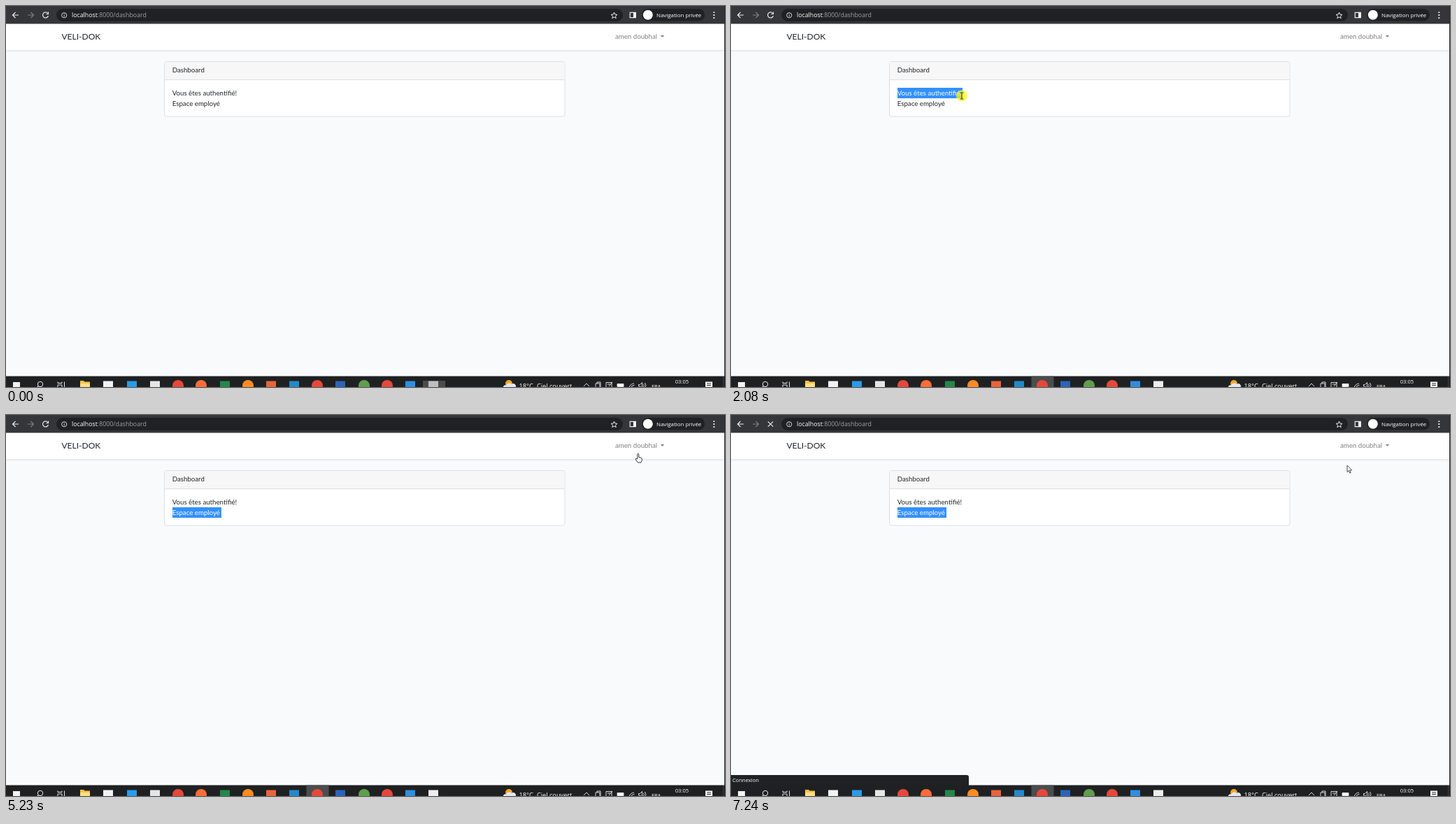
An HTML page for the animation above (8 s loop, 1028 px wide and 545 px high).

```html
<!DOCTYPE html>
<html lang="fr">
<head>
<meta charset="utf-8">
<title>Dashboard</title>
<style>
html, body { margin: 0; width: 100%; height: 100%; overflow: hidden; background: #f8fafc; }
svg { display: block; }
text { font: 9.7px Lato, sans-serif; fill: #212529; white-space: pre; }
.ui text, text.ui { font-family: "Open Sans", "Noto Sans", sans-serif; fill: #fff; }
.line { fill: none; stroke: #e8eaed; stroke-width: 1.2; }
</style>
</head>
<body>
<svg id="stage" width="1028" height="545" viewBox="0 0 1028 545">
  <defs>
    <filter id="soft" x="-5%" y="-50%" width="110%" height="200%"><feGaussianBlur stdDeviation="1.3"/></filter>
  </defs>
  <rect width="1028" height="545" fill="#f8fafc"/>

  <!-- page -->
  <rect y="28" width="1028" height="36.5" opacity=".09" filter="url(#soft)"/>
  <rect y="25" width="1028" height="38" fill="#fff"/>
  <text x="79.5" y="47.5" style="font-size:12px">VELI-DOK</text>
  <g id="user" opacity=".5">
    <text x="931" y="47" text-anchor="end" style="fill:#000">amen doubhal</text>
    <path d="M935.8 42h5.4l-2.7 2.8z"/>
  </g>
  <rect x="226.5" y="79.5" width="572.5" height="78.5" rx="3" fill="#fff" stroke="#dedfe0"/>
  <path d="M227 105.5V82.5q0-2.5 2.5-2.5H796q2.5 0 2.5 2.5v23z" fill="#f7f7f7"/>
  <path d="M227 105.5H798.5" stroke="#dedfe0"/>
  <text x="237.7" y="95.3">Dashboard</text>
  <text x="237.7" y="127.5">Vous êtes authentifié!</text>
  <text x="237.7" y="142.5">Espace employé</text>
  <svg id="pick1" x="238" y="117" width="0" height="15">
    <rect width="100" height="15" fill="#3390ff"/><text x="-.3" y="10.5" style="fill:#fff">Vous êtes authentifié!</text>
  </svg>
  <svg id="pick2" x="238" y="132" width="0" height="15">
    <rect width="100" height="15" fill="#3390ff"/><text x="-.3" y="10.5" style="fill:#fff">Espace employé</text>
  </svg>
  <g id="menu">
    <rect x="839.5" y="58.5" width="106.5" height="53" rx="3" fill="#fff" stroke="#d5d7d9"/>
    <rect id="hover" x="840" y="64" width="105.5" height="21" fill="#e9ecef"/>
    <text x="850.7" y="77.7">Profil</text>
    <text x="850.7" y="98.8">Logout</text>
  </g>

  <!-- browser bar -->
  <g class="ui">
    <rect width="1028" height="25.5" fill="#35363a"/>
    <rect x="72" y="4" width="810" height="18" rx="9" fill="#202124"/>
    <rect x="909" y="4" width="90" height="17.5" rx="8.7" fill="#202124"/>
    <path class="line" d="M18 13H10M13.5 9l-4 4 4 4"/>
    <path class="line" d="M31 13h8M35.5 9l4 4-4 4" opacity=".4"/>
    <path class="line" id="reload" d="M59.7 10.5A4 4 0 1 0 60.4 14M60.5 8.5v3h-3"/>
    <path class="line" id="stop" d="M52.8 9.3l7.4 7.4M60.2 9.3l-7.4 7.4"/>
    <circle class="line" cx="83.2" cy="13.2" r="3.6" style="stroke-width:.9"/>
    <path class="line" d="M83.2 11v1M83.2 12.8v2.5" style="stroke-width:.9"/>
    <text x="94" y="16.3" style="font-size:8.8px">localhost<tspan fill="#9aa0a6">:8000/dashboard</tspan></text>
    <path class="line" style="stroke-width:1" d="M869.5 9l1.2 3 3.2.3-2.4 2.1.7 3.2-2.7-1.7-2.7 1.7.7-3.2-2.4-2.1 3.2-.3z"/>
    <path class="line" d="M892.2 9.3h8v7.4h-8z"/><path d="M897 9h3.5v8H897z" fill="#fff"/>
    <circle cx="917.8" cy="12.8" r="7" fill="#fff"/>
    <text x="930" y="15.7" style="font-size:7.9px">Navigation privée</text>
    <path d="M1012.3 8.2v9.8" stroke="#e8eaed" stroke-width="1.9" stroke-dasharray="1.9 2"/>
  </g>

  <!-- link preview -->
  <g id="status" class="ui">
    <path id="statusBox" fill="#202124"/>
    <text id="statusText" x="2" y="525" style="font-size:7.6px"></text>
  </g>

  <!-- taskbar -->
  <rect y="529.5" width="1028" height="16" fill="#1f2022"/>
  <rect id="active" y="529.5" width="32" height="16" fill="#4b4c4e"/>
  <g id="apps"></g>
  <g class="ui">
    <circle class="line" cx="49" cy="541" r="3.7" style="stroke-width:1"/><path class="line" d="M46.4 543.6l-3 3"/>
    <path class="line" style="stroke-width:1" d="M74 537.5v2h6v-2M74 545v-3h6v3M83.5 537.5v8"/>
    <path d="M106 545v-9h5l1.5 1.5h7.5v8z" fill="#f5c344"/><path d="M106 540h14v5h-14z" fill="#ffdf85"/>
    <circle cx="719" cy="540" r="5" fill="#f5a623"/>
    <path d="M711 546a3 3 0 0 1 4-3.5 4.5 4.5 0 0 1 8-1.2 3.4 3.4 0 0 1 5 4.7z" fill="#dfe8f2"/>
    <text x="733.5" y="547" style="font-size:9.2px">18°C</text>
    <text x="759" y="547" style="font-size:9.2px">Ciel couvert</text>
    <g class="line" style="stroke-width:.9">
      <path d="M826 544l4-4 4 4"/>
      <path d="M843 546v-6h6v6M845 540v-2h5v7"/>
      <path d="M858 546v-7.5h8v7.5M860 541h4M862 544l5-6"/>
      <path d="M874 540.5h9v4h-9z" fill="#fff"/>
      <path d="M891 546a8 8 0 0 1 7-6M893.5 546a5 5 0 0 1 5-3.5"/>
      <path d="M904.5 541.5h2l3-3v8l-3-2.5h-2zM911.5 540.5q1.5 2 0 4.5M913.5 539q3 3.5 0 7"/>
    </g>
    <text x="923" y="546.5" style="font-size:7.6px">FRA</text>
    <text x="956.7" y="539.6" style="font-size:7.6px">03:05</text>
    <path d="M1000 537.5h10v8h-10z" fill="#fff"/><path d="M1002 540h6M1002 542.5h6" stroke="#1f2022"/>
    <path d="M1025.5 530v15" stroke="#55575a" stroke-width=".6"/>
  </g>
  <path d="M1027.5 0V545" stroke="#24262a"/>

  <!-- pointer -->
  <g id="pointer">
    <circle id="press" r="8" fill="#ff0" opacity=".68"/>
    <path id="arrow" d="M0 0V9.5L2.2 7.5 3.8 11 5.2 10.4 3.7 7H6.7Z" fill="#fff" stroke="#222" stroke-width=".8"/>
    <path id="beam" d="M-2.5-4.5H2.5M0-4.5V4.5M-2.5 4.5H2.5" stroke="#333"/>
    <path id="hand" d="M-1.2 7V.3a1 1 0 0 1 2 0V4.5l3.3.8q1.1.3 1.1 1.5V9L4 12H-.6L-3.5 8q-1-1.6.5-1.8z" fill="#fff" stroke="#222" stroke-width=".9"/>
  </g>
</svg>

<script>
const LOOP = 8000;
const $ = id => document.getElementById(id);
const show = (id, on) => $(id).setAttribute("display", on ? "inline" : "none");
const set = (id, name, value) => $(id).setAttribute(name, value);

// App marks: centre x, colour, round or square
const apps = [
  [15, "#f2f2f2"], [146, "#f2f2f2"], [180, "#2a9be8"], [213, "#e6e6e6"],
  [246, "#e5483a", 1], [279, "#ff6c37", 1], [313, "#23884a"], [346, "#ff8a22", 1],
  [379, "#e8643c"], [412, "#2489ca"], [445, "#e5483a", 1], [478, "#2b64b8"],
  [512, "#5f9e4d", 1], [545, "#e5483a", 1], [578, "#2f8ee0"], [611, "#eeeeee"]
];
$("apps").innerHTML = apps.map(([x, color, round]) => round
  ? `<circle cx="${x}" cy="543" r="8" fill="${color}"/>`
  : x === 15 ? `<rect x="10" y="538" width="10" height="10" fill="${color}"/>`
  : `<rect x="${x - 7}" y="536.5" width="14" height="14" fill="${color}"/>`).join("");
const recorder = $("apps").lastChild;

// Pointer path: time, x, y
const path = [
  [70, 798, 400], [860, 241, 80], [930, 240, 84], [1330, 236, 123], [1530, 235, 123],
  [1670, 235, 123], [1740, 238, 127], [2080, 330, 128.5], [2150, 330, 128.5],
  [2420, 338, 133], [2550, 338, 133], [3370, 240, 141], [3650, 240, 141],
  [3720, 237, 139], [3950, 326, 148], [4440, 326, 148], [4710, 755, 61],
  [4840, 755, 61], [5230, 904, 56], [5430, 903, 48], [5770, 903, 49],
  [5970, 898, 69], [6640, 877, 72], [6910, 881, 72], [LOOP, 881, 72]
];
const presses = [[1740, 2220], [3720, 4050], [5430, 5570], [7040, 7180]];
const shapes = [[0, "arrow"], [1740, "beam"], [3850, "arrow"], [5100, "hand"], [7240, "arrow"]];

const ramp = (t, a, b) => Math.min(1, Math.max(0, (t - a) / (b - a)));

function pointerAt(t) {
  const i = Math.max(1, path.findIndex(p => p[0] > t));
  const [a, b] = [path[i - 1], path[i]];
  const k = ramp(t, a[0], b[0]);
  return [a[1] + (b[1] - a[1]) * k, a[2] + (b[2] - a[2]) * k];
}

function drawStatus(t) {
  const [text, width] =
    t >= 7240 ? ["Connexion", 340] :
    t >= 7110 ? ["", 0] :
    t >= 5900 ? ["localhost:8000/employees/10", 111] :
    t >= 5570 ? ["localhost:8000/dashboard#", 108] : ["", 0];
  show("status", width);
  set("statusBox", "d", `M0 515H${width - 3}q3 0 3 3V530H0z`);
  $("statusText").textContent = text;
}

function draw(t) {
  const [x, y] = pointerAt(t);
  set("pointer", "transform", `translate(${x} ${y})`);
  show("pointer", t >= 70);
  show("press", presses.some(([a, b]) => t >= a && t < b));
  const shape = shapes.filter(s => s[0] <= t).pop()[1];
  for (const id of ["arrow", "beam", "hand"]) show(id, id === shape);

  set("pick1", "width", t < 3720 ? 93 * ramp(t, 1740, 2060) : 0);
  set("pick2", "width", 70 * ramp(t, 3720, 3900));

  const open = t >= 5500 && t < 7110;
  show("menu", open);
  show("hover", t >= 5900);
  set("user", "opacity", open ? .7 : .5);
  show("reload", t < 7110);
  show("stop", t >= 7110);
  drawStatus(t);

  set("active", "x", t < 1740 ? 596 : 429.5);
  set("active", "y", t < 70 ? 536 : 529.5);
  recorder.setAttribute("opacity", t < 70 ? .7 : 1);
}

function tick() {
  draw(performance.now() % LOOP);
  requestAnimationFrame(tick);
}
tick();
</script>
</body>
</html>
```
